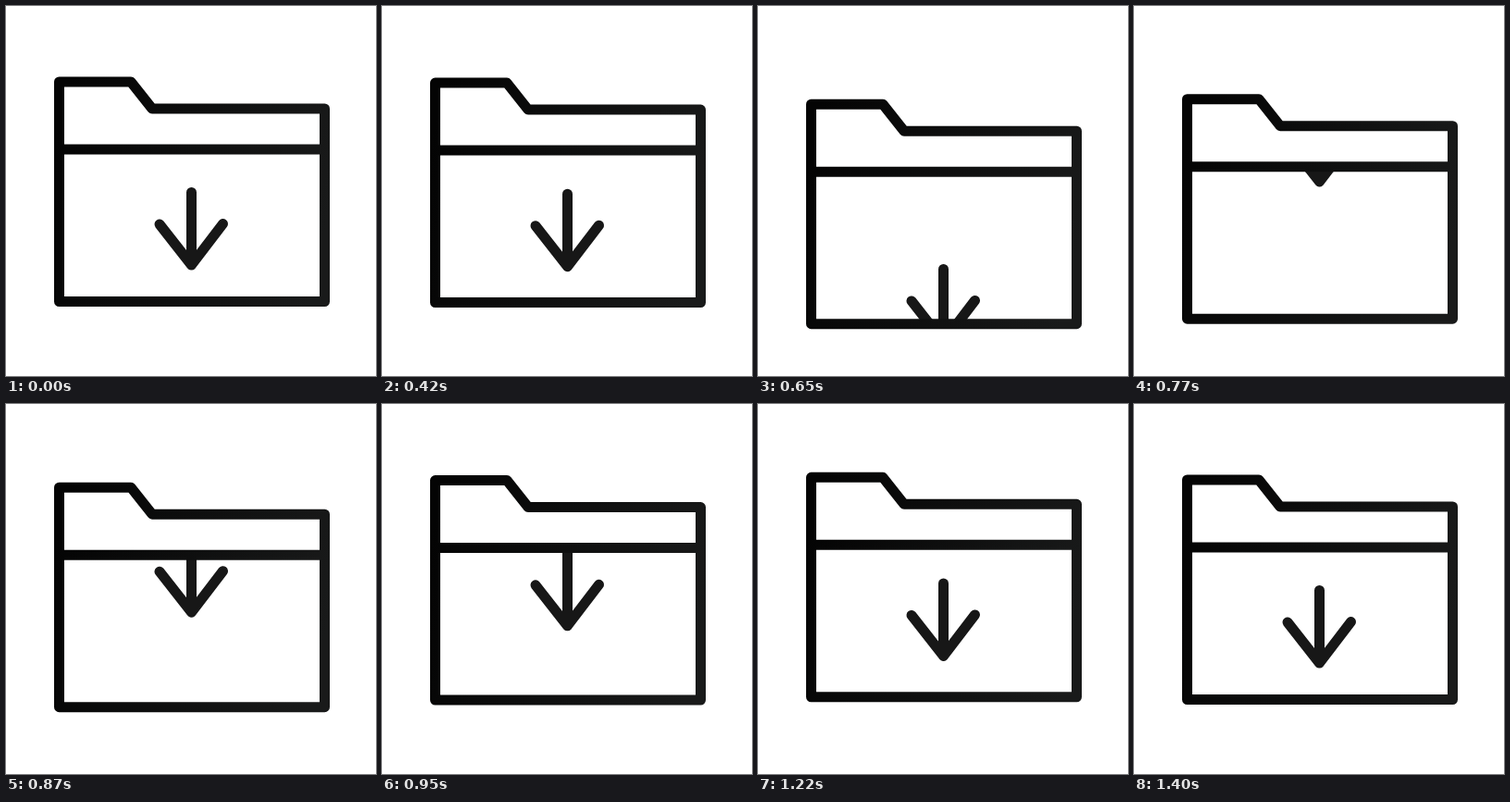
Recreate the animation shown at these times as an HTML page. Size 400x400 px, loop 1420 ms.

```html
<!DOCTYPE html>
<html lang="en">
<head>
<meta charset="utf-8">
<title>Folder download</title>
<style>
  html, body { margin: 0; width: 100%; height: 100%; overflow: hidden; background: #fff; }
  svg { display: block; width: 100%; height: 100%; }
</style>
</head>
<body>
<svg viewBox="0 0 400 400" fill="none" stroke-width="11" stroke-linecap="round" stroke-linejoin="round">
  <defs>
    <linearGradient id="ink" gradientUnits="userSpaceOnUse" x1="52" y1="150" x2="350" y2="220">
      <stop offset="0" stop-color="#040404"/>
      <stop offset="1" stop-color="#191a1a"/>
    </linearGradient>
    <clipPath id="pocket"><path d="M57 155H345V319.5H57Z"/></clipPath>
    <path id="arrow" d="M200.5 201.5V280M166 236L200.5 280L234.5 235.5"/>
  </defs>
  <g id="folder">
    <g clip-path="url(#pocket)" stroke="#171717">
      <g id="arrows">
        <use href="#arrow"/>
        <use href="#arrow" y="-230"/>
      </g>
    </g>
    <path stroke="url(#ink)" d="M57.5 82H135L158 111H344.5V319.5H57.5ZM57.5 155H344.5"/>
  </g>
</svg>
<script>
const LOOP = 1420, START = 420, END = 1400, STEP = 230;
const folder = document.getElementById('folder');
const arrows = document.getElementById('arrows');

// Keys: time in ms, offset in px, slope in px per ms
const bounce = [
  [420, 1, 0.1], [550, 17.6, 0.105], [650, 24.2, 0.015],
  [870, 8.3, -0.108], [1070, -4.7, 0], [1400, 0, 0]
];
const drop = [
  [420, 0.5, 0.06], [550, 24.7, 0.25], [650, 58.3, 0.42],
  [870, STEP - 63.3, 0.32], [1070, STEP - 19, 0.13], [1400, STEP, 0]
];

// Cubic Hermite curve through the keys
function curve(keys, t) {
  const i = keys.findIndex(k => k[0] > t);
  const [t0, a, va] = keys[i - 1], [t1, b, vb] = keys[i];
  const d = t1 - t0, u = (t - t0) / d, w = 1 - u;
  return a * w * w * (1 + 2 * u) + b * u * u * (3 - 2 * u) + d * u * w * (va * w - vb * u);
}

const shift = (el, y) => el.setAttribute('transform', `translate(0 ${y.toFixed(2)})`);

function draw(now) {
  const t = now % LOOP, moving = t >= START && t < END;
  shift(folder, moving ? curve(bounce, t) : 0);
  shift(arrows, moving ? curve(drop, t) : 0);
  requestAnimationFrame(draw);
}
draw(performance.now());
</script>
</body>
</html>
```
